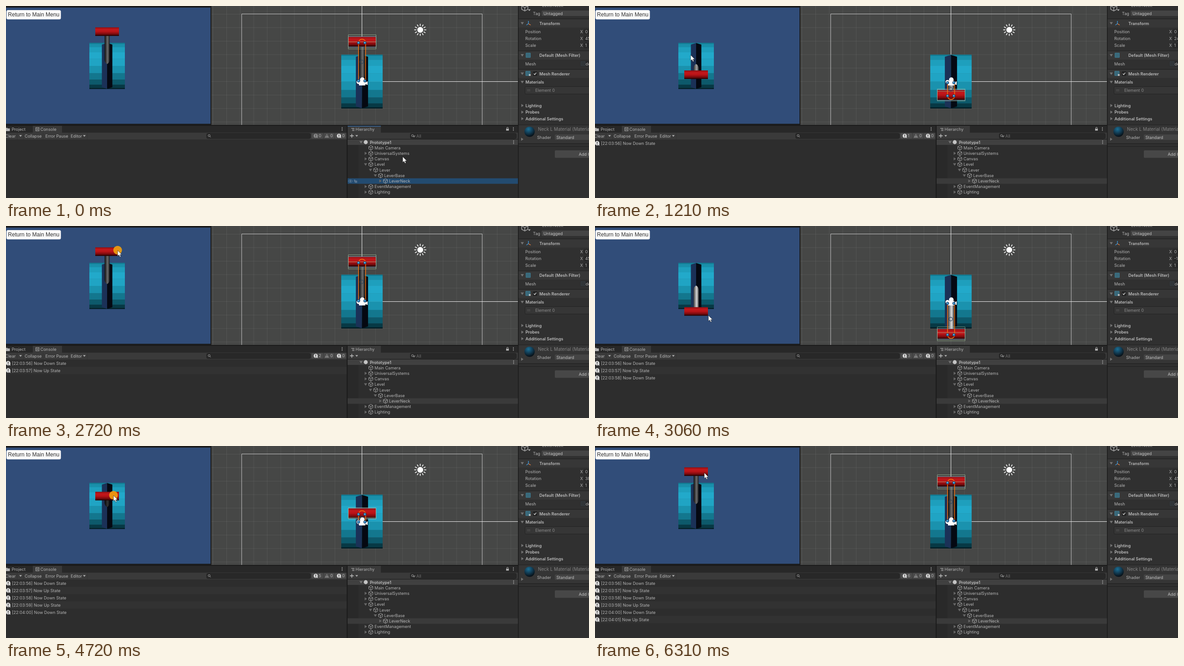
Animation, 1280 px wide and 423 px high, one loop 6.38 s. Source, as an HTML page:

```html
<!DOCTYPE html>
<html lang="en">
<head>
<meta charset="utf-8">
<title>Lever prototype</title>
<style>
html, body { margin: 0; width: 100%; height: 100%; overflow: hidden; background: #2d2d2d; }
svg { display: block; }
text { font-family: Inter, "Liberation Sans", sans-serif; font-size: 9.1px; white-space: pre; }
</style>
</head>
<body>
<svg id="stage" width="1280" height="423" viewBox="0 0 1280 423">
  <defs>
    <linearGradient id="red" x1="0" y1="0" x2="0" y2="1">
      <stop offset="0" stop-color="#8e1013"/><stop offset=".25" stop-color="#c4171b"/>
      <stop offset=".5" stop-color="#b81317"/><stop offset=".78" stop-color="#7a0a0d"/>
      <stop offset="1" stop-color="#1c0203"/>
    </linearGradient>
    <radialGradient id="ball" cx=".4" cy=".25" r=".8">
      <stop offset="0" stop-color="#1c6f94"/><stop offset=".45" stop-color="#123f58"/>
      <stop offset="1" stop-color="#06090d"/>
    </radialGradient>
  </defs>
</svg>
<script>
const LOOP = 6380, TICK = 68, SWING = 300;
const NS = 'http://www.w3.org/2000/svg';
const stage = document.getElementById('stage');

function el(tag, attrs, parent = stage) {
  const n = document.createElementNS(NS, tag);
  set(n, attrs);
  parent.appendChild(n);
  return n;
}
function set(n, attrs) { for (const k in attrs) n.setAttribute(k, attrs[k]); }
const group = (parent, attrs = {}) => el('g', attrs, parent);
const rect = (x, y, width, height, fill, more = {}, parent) => el('rect', { x, y, width, height, fill, ...more }, parent);
const path = (d, more = {}, parent) => el('path', { d, fill: 'none', ...more }, parent);
const dot = (cx, cy, r, fill, more = {}, parent) => el('circle', { cx, cy, r, fill, ...more }, parent);
// y is the middle of the text line
function label(x, y, str, more = {}, parent) {
  const n = el('text', { x, y: y + 3.3, fill: '#b4b4b4', ...more }, parent);
  n.textContent = str;
  return n;
}
const bold = (x, y, str, parent) => label(x, y, str, { 'font-weight': 600, fill: '#bcbcbc' }, parent);
function fold(x, y, open, fill = '#747474') {
  path(open ? `M${x - 3.5} ${y - 2.5}h7l-3.5 5.5z` : `M${x - 2} ${y - 3.5}v7l5-3.5z`, { fill });
}
const caret = (x, y, fill = '#b4b4b4') => path(`M${x - 3} ${y - 1.5}h6l-3 3.5z`, { fill });
function cube(x, y, s = 1) {
  path('M0-5 4.5-2.5V2.5L0 5-4.5 2.5V-2.5ZM-4.5-2.5 0 0 4.5-2.5M0 0V5',
    { transform: `translate(${x} ${y}) scale(${s})`, stroke: '#b0b0b0', 'stroke-width': .9 });
}
function lens(x, y) {
  dot(x, y - .5, 2.2, 'none', { stroke: '#a8a8a8', 'stroke-width': .9 });
  path(`M${x + 1.5} ${y + 1}l2 2.3`, { stroke: '#a8a8a8' });
}
function menuDots(x, y) { for (const d of [-3, 0, 3]) dot(x, y + d, .9, '#b4b4b4'); }

// Lever model, in units of the game view
function lever(cx, cy, scale, id) {
  const g = group(stage, { transform: `translate(${cx} ${cy}) scale(${scale})` });
  const tones = ['#127b92', '#1990ab', '#1e9fbd', '#22a9ca', '#20a4c4', '#1a92ae', '#13778e', '#0d596b', '#073945', '#042028'];
  const edge = i => -51 * Math.cos(i * Math.PI / 10);
  tones.forEach((c, i) => rect(-39, edge(i), 78, edge(i + 1) - edge(i) + (i < 9 ? .3 : 0), c, {}, g));
  path('M0-50.5-11.5-47V47L0 50.5Z', { fill: '#1b3157' }, g);
  path('M0-50.5 11.5-47V47L0 50.5Z', { fill: '#050912' }, g);
  const grad = el('linearGradient', { id, x1: 0, x2: 1 }, g);
  const stops = [0, .6, 1].map(offset => el('stop', { offset }, grad));
  const neck = path('', { fill: `url(#${id})` }, g);
  const grip = rect(-26, 0, 52, 19, 'url(#red)', {}, g);
  return p => {
    const h = -75.5 * p, up = p > 0, m = Math.abs(p);
    const end = up ? 5 - 9 * p : -6 + 7 * m;
    const cap = (up ? -1 : 1) * Math.min(9, Math.abs(h - end));
    set(neck, { d: `M-5.5 ${h}V${end + cap}Q-5 ${end + cap * .3} 0 ${end}Q5 ${end + cap * .3} 5.5 ${end + cap}V${h}Z` });
    const v = up ? 30 + 80 * m : 140 + 100 * m;
    const shade = up ? [.12, 1, .25] : [.3, 1, .4];
    shade.forEach((k, i) => { const c = Math.round(v * k); set(stops[i], { 'stop-color': `rgb(${c},${c},${c})` }); });
    set(grip, { y: h - 9.5 });
  };
}

// Game view
rect(0, 0, 1280, 423, '#1b1b1b');
rect(0, 3.5, 449, 256, '#314d79');
rect(1, 9, 119.5, 20.5, '#fafafa', { rx: 3.5 });
label(4.3, 19.6, 'Return to Main Menu', { style: 'font:12.1px "Liberation Sans",Arial,sans-serif', fill: '#323232' });
const gameLever = lever(222, 132, 1, 'neckA');

// Scene view
rect(451, 0, 673, 262, '#464746');
let grid = '';
for (let x = 781.5 - 29.7 * 11; x < 1124; x += 29.7) grid += `M${x} 0V262`;
for (let y = 166.5 - 29.7 * 5; y < 262; y += 29.7) grid += `M451 ${y}H1124`;
path(grid, { stroke: '#fff', 'stroke-opacity': .075 });
path('M517.5 262V17.5H1045.5V262', { stroke: '#c4c4c4' });
path('M781.5 0V166.5H1124', { stroke: '#f0f0f0' });
dot(909.5, 52.5, 6.8, '#fff', { stroke: '#2a2a2a', 'stroke-width': .6 });
for (let i = 0; i < 12; i++)
  path('M0-8.5V-13.3', { stroke: '#fff', 'stroke-width': 1.6, transform: `translate(909.5 52.5) rotate(${i * 30})` });
const sceneLever = lever(781.5, 166.5, 1.165, 'neckB');
const gripEdge = rect(751.5, 0, 61, 23, 'none', { stroke: '#86a4be', 'stroke-width': .9 });
const collider = path('', { stroke: '#a3c49c', 'stroke-width': .7 });
const outline = path('', { stroke: '#f2700f', 'stroke-width': 1.6 });
const middle = dot(781, 0, 4, 'none', { stroke: '#23415f', 'stroke-width': 1.2 });
const camera = group(stage);
dot(782.3, 162.3, 5, '#fff', {}, camera);
dot(774, 167.3, 4.4, '#fff', {}, camera);
path('M775 165H789V168L794 166V174L789 172V175H775Z', { fill: '#fff' }, camera);
const knobs = [0, 1, 2, 3].map(i => dot(i % 2 ? 788 : 774, 0, 3, '#2f83c2', { stroke: '#123550', 'stroke-width': .9 }));
const knobShine = [0, 1, 2, 3].map(i => dot(i % 2 ? 787.4 : 773.4, 0, 1.1, '#8cc0e4'));

function drawScene(a) {
  const p = ratio(a), y = 166.5 - 87.5 * p, sign = p > 0 ? 1 : -1;
  sceneLever(p);
  set(gripEdge, { y: y - 11.5 });
  const rad = Math.PI / 180, turn = (45 - Math.abs(a)) * rad;
  const out = 15.5 * Math.cos(turn), face = y + sign * 15.5 * Math.sin(turn);
  set(collider, { d: `M751.5 ${y - out}H812.5V${y + out}H751.5ZM751.5 ${face}H812.5` });
  const near = 168 - 3 * p, far = y + 2;
  set(outline, { d: `M774 ${near}V${far}C774 ${far - sign * 10.5} 789.5 ${far - sign * 10.5} 789.5 ${far}V${near}` });
  set(middle, { cy: (near + far) / 2 });
  knobs.forEach((k, i) => {
    const cy = i < 2 ? far : near;
    set(k, { cy });
    set(knobShine[i], { cy: cy - .6 });
  });
}

// Console
rect(0, 262, 1280, 161, '#1b1b1b');
rect(0, 264, 748, 15.5, '#282828');
rect(59, 264, 64, 15.5, '#3a3a3a');
rect(0, 279, 748, 15, '#3a3a3a');
rect(0, 294, 748, 129, '#2d2d2d');
path('M0 268.5h3l1 1.2h4.5v6H0z', { fill: '#b4b4b4' });
label(12.5, 271.8, 'Project');
rect(65.5, 268, 7, 7, 'none', { stroke: '#b4b4b4' });
path('M67 270.5h4M67 272.5h4', { stroke: '#b4b4b4', 'stroke-width': .8 });
label(75.5, 271.8, 'Console');
menuDots(738, 271);
label(-1.5, 286.2, 'Clear');
caret(32, 286);
label(41, 286.2, 'Collapse');
label(86.5, 286.2, 'Error Pause');
label(142, 286.2, 'Editor');
caret(172, 286);
path('M24.5 279V294M38.5 279V294M81.5 279V294M138.5 279V294M178.5 279V294', { stroke: '#303030', 'stroke-width': .7 });
rect(440.5, 280.5, 228, 11.5, '#282828', { rx: 3, stroke: '#1f1f1f', 'stroke-width': .8 });
lens(446, 286);
rect(671, 280, 25.5, 12, '#4a4a4a', { rx: 2 });
rect(697.5, 280, 23.5, 12, '#4a4a4a', { rx: 2 });
rect(722, 280, 24.5, 12, '#4a4a4a', { rx: 2 });
function alertIcon(x, y, r, parent) {
  const g = group(parent || stage);
  dot(x, y, r, '#dadada', {}, g);
  path(`M${x + r * .2} ${y + r * .7}L${x + r} ${y + r * 1.1}L${x + r * .9} ${y}Z`, { fill: '#dadada' }, g);
  path(`M${x} ${y - r * .6}V${y + r * .15}M${x} ${y + r * .4}V${y + r * .7}`, { stroke: '#333', 'stroke-width': 1.5 }, g);
  return g;
}
const infoIcon = alertIcon(680, 286, 4.5);
const countText = label(686.5, 286, '0');
path('M704.5 281.5 709 290H700Z', { fill: '#858585' });
path('M704.5 284v3M704.5 288v1', { stroke: '#444', 'stroke-width': 1.2 });
label(712, 286, '0');
alertIcon(731, 286, 4.5);
label(738, 286, '0');

const stamps = ['22:03:56', '22:03:57', '22:03:58', '22:03:59', '22:04:00', '22:04:01'];
const logs = stamps.map((s, i) => {
  const g = group(stage), y = 302.3 + 16 * i;
  if (i % 2) rect(0, y - 8, 748, 16, '#323232', {}, g);
  alertIcon(4.7, y, 5, g);
  label(13, y, `[${s}] Now ${i % 2 ? 'Up' : 'Down'} State`, {}, g);
  return g;
});

// Hierarchy
rect(750, 264, 374, 15.5, '#282828');
rect(750, 264, 73, 15.5, '#3a3a3a');
const focusLine = rect(750, 264, 73, 1.3, '#3a72b0');
path('M758 269.5h7M760 272h5M760 274.5h5', { stroke: '#b4b4b4' });
label(767.5, 271.8, 'Hierarchy');
rect(1098, 270.5, 6, 4, '#b4b4b4');
path('M1099.3 270.5v-1.5a1.8 1.8 0 0 1 3.6 0v1.5', { stroke: '#b4b4b4' });
menuDots(1114, 271);
rect(750, 279, 374, 14, '#3a3a3a');
path('M755 286h8.5M759.3 281.7v8.5', { stroke: '#c8c8c8', 'stroke-width': 1.3 });
caret(770, 286);
rect(887.5, 280.5, 233, 11.5, '#282828', { rx: 3, stroke: '#1f1f1f', 'stroke-width': .8 });
lens(892.5, 286);
caret(896.5, 287, '#777');
label(901, 286.2, 'All', { fill: '#6c6c6c' });
rect(750, 294, 374, 129, '#2d2d2d');
rect(750, 294, 24, 129, '#292929');
rect(750, 294, 374, 12, '#404040');
const selected = rect(750, 379.6, 374, 12.1, '#234b70');
fold(779.5, 300, true);
dot(789.8, 300, 4.4, '#c4c4c4');
bold(799, 300.2, 'Prototype1');
menuDots(1114.5, 300);
const nodes = [
  ['Main Camera', 0, ''], ['UniversalSystems', 0, 'shut'], ['Canvas', 0, 'shut'], ['Level', 0, 'open'],
  ['Lever', 1, 'open'], ['LeverBase', 2, 'open'], ['LeverNeck', 3, 'shut'], ['EventManagement', 0, 'shut'], ['Lighting', 0, 'shut']
];
nodes.forEach(([name, depth, arrow], i) => {
  const x = 801 + depth * 10.7, y = 312.4 + 12.2 * i;
  if (arrow) fold(x - 11.5, y, arrow === 'open', '#686868');
  cube(x, y);
  label(x + 8, y + .1, name);
});
const hover = group(stage, { opacity: .65 });
path('M751 385.7q5-6 10 0q-5 6-10 0z', { stroke: '#8097ac' }, hover);
dot(756, 385.7, 1.7, '#8097ac', {}, hover);
path('M764 383v3l2.5 3.5h4.5v-4.5l-4-1-1-2z', { fill: '#7088a0' }, hover);

// Inspector
rect(1125.5, 0, 155, 423, '#303030');
cube(1139, 3.5, 1.5);
caret(1149, 9);
label(1177, -1, 'LeverNeck');
label(1157, 16.3, 'Tag');
rect(1176, 10, 110, 12, '#444', { rx: 2 });
label(1180, 16.3, 'Untagged', { fill: '#c4c4c4' });
const rule = y => rect(1125.5, y, 155, 1, '#1e1e1e');
function section(y, name, open = true) {
  rule(y - 10);
  rect(1125.5, y - 9, 155, 18.5, '#373737');
  fold(1133.5, y, open);
  bold(1171, y + .2, name);
}
section(38, 'Transform');
path('M1147 39V33M1147 39 1142.5 42', { stroke: '#3d9be0', 'stroke-width': 1.4 });
path('M1147 39 1152 42', { stroke: '#f0803c', 'stroke-width': 1.4 });
const fields = [['Position', '0'], ['Rotation', '45'], ['Scale', '1']].map(([name, value], i) => {
  const y = 56.4 + 15.3 * i;
  label(1140, y, name);
  label(1260.5, y, 'X');
  rect(1269, y - 6, 20, 12, '#282828', { rx: 2 });
  return label(1271.5, y, value);
});
section(108.5, 'Default (Mesh Filter)');
function mesh(x, y, stroke = '#3fa3c8') {
  rect(x - 4.5, y - 4.5, 9, 9, 'none', { stroke });
  path(`M${x - 4.5} ${y - 1.5}h9m-9 3h9M${x - 1.5} ${y - 4.5}v9m3-9v9`, { stroke, 'stroke-width': .8 });
}
mesh(1146.5, 108.5);
label(1140, 127.3, 'Mesh');
rect(1261, 121, 25, 12, '#282828', { rx: 2 });
mesh(1267, 127, '#3c444a');
label(1272.5, 127.3, 'default');
section(149, 'Mesh Renderer');
mesh(1146, 148.5);
dot(1150, 152, 2.2, '#b8b8b8');
rect(1157, 144.5, 9, 9, '#262626', { rx: 1.5, stroke: '#1a1a1a', 'stroke-width': .8 });
path('M1158.8 149l2 2.2 3.6-4.4', { stroke: '#d8d8d8', 'stroke-width': 1.3 });
for (const [name, y] of [['Materials', 167.5], ['Lighting', 219.2], ['Probes', 233.8], ['Additional Settings', 248.3]]) {
  fold(1133.5, y, name === 'Materials');
  bold(1140.5, y, name);
}
rect(1139.5, 177.5, 150, 16.5, '#363636', { rx: 2, stroke: '#232323' });
path('M1144 184.5h7M1144 187h7', { stroke: '#555' });
label(1162, 186, 'Element 0', { fill: '#8c8c8c' });
rule(261.5);
rect(1125.5, 262.5, 155, 39.5, '#353535');
dot(1149.5, 277, 11.3, 'url(#ball)');
label(1168, 271.3, 'Neck L Material (Material)', { style: 'font-size:9.8px', fill: '#858585' });
label(1166, 289.3, 'Shader');
rect(1205, 283, 85, 12, '#444', { rx: 2 });
label(1208.5, 289.3, 'Standard', { fill: '#c4c4c4' });
fold(1133, 293.5, false);
rule(303);
rule(309);
rect(1205, 318, 100, 16.5, '#474747', { rx: 2 });
label(1257.5, 326.3, 'Add Component', { fill: '#c4c4c4' });

// Pointer
const press = dot(0, 0, 9.5, '#f0a010', { 'fill-opacity': .9 });
const pointer = path('M0 0V12.5L2.9 9.9 5 14.6 7.1 13.7 5.1 9.2H9Z', { fill: '#fff', stroke: '#1c1c1c', 'stroke-width': .6 });

// Start of each swing and how late the inspector shows it; directions alternate, down first
const swings = [[1039, 117], [1971, 60], [2804, 101], [3503, 51], [4581, 89], [5780, 80]];
const trail = [
  [0, 871, 332], [60, 871, 332], [660, 246, 57], [960, 228, 53], [1090, 216, 56], [1224, 210, 108], [1560, 212, 198],
  [1960, 214, 203], [2176, 211, 94], [2420, 235, 62], [2690, 245, 53], [2840, 246, 60], [3060, 249, 197],
  [3440, 246, 204], [3672, 229, 95], [4000, 238, 62], [4470, 240, 52], [4580, 239, 60], [4692, 236, 109],
  [4900, 236, 180], [5030, 232, 176], [5200, 231, 172], [5508, 238, 203], [5780, 238, 200], [6060, 240, 92],
  [6256, 241, 61], [6320, 240, 59]
];
const clamp = v => Math.max(0, Math.min(1, v));
const ratio = a => Math.sin(a * Math.PI / 180) / Math.SQRT1_2;
const angle = t => swings.reduce((a, [s], i) => a + (i % 2 ? 90 : -90) * clamp((t - s) / SWING), 45);

function pointerAt(t) {
  const i = trail.findIndex(k => k[0] > t);
  if (i < 0) return trail[trail.length - 1].slice(1);
  const [t0, x0, y0] = trail[i - 1], [t1, x1, y1] = trail[i];
  const f = (t - t0) / (t1 - t0), e = f * f * (3 - 2 * f);
  return [x0 + (x1 - x0) * e, y0 + (y1 - y0) * e];
}

function draw(t) {
  gameLever(ratio(angle(t)));
  drawScene(angle(t + 11));

  const lag = swings.reduce((l, [s, d]) => t >= s ? d : l, 0);
  const shown = angle(t - lag);
  fields[1].textContent = Math.abs(shown) === 45 ? shown : shown.toFixed(3);

  const count = swings.filter(([s]) => t >= s + 60).length;
  logs.forEach((g, i) => set(g, { visibility: i < count ? 'visible' : 'hidden' }));
  countText.textContent = count;
  set(infoIcon, { opacity: count ? 1 : .45 });

  const [x, y] = pointerAt(t);
  set(pointer, { transform: `translate(${x} ${y})` });
  const held = swings.some(([s]) => t >= s - 100 && t < s + 130);
  set(press, { cx: x, cy: y - .5, visibility: held ? 'visible' : 'hidden' });

  const focused = t < swings[0][0] - 100;
  set(selected, { fill: focused ? '#234b70' : '#3a3a3a' });
  set(focusLine, { visibility: focused ? 'visible' : 'hidden' });
  set(hover, { visibility: x > 750 ? 'visible' : 'hidden' });
}

const began = performance.now();
function frame() {
  const t = (performance.now() - began) % LOOP;
  draw(Math.floor((t + 15) / TICK) * TICK);
  requestAnimationFrame(frame);
}
frame();
</script>
</body>
</html>
```
